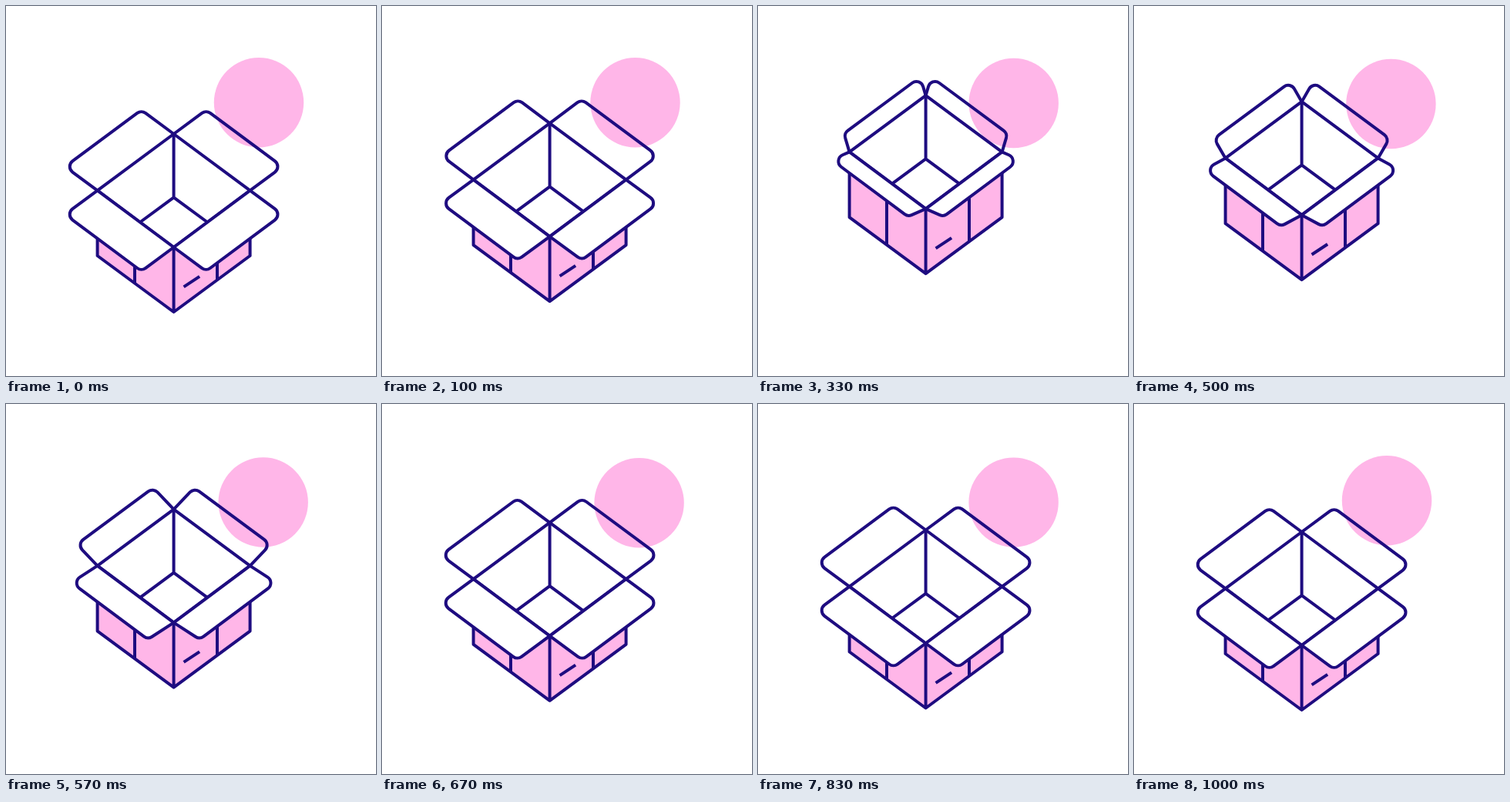
Write an HTML page that moves like this. It is 480 by 480 pixels and loops after 1030 ms.

```html
<!DOCTYPE html>
<html lang="en">
<head>
<meta charset="utf-8">
<title>Open box</title>
<style>
  html, body { margin: 0; width: 100%; height: 100%; overflow: hidden; background: #fff; }
  svg { display: block; width: 100vw; height: 100vh; }
  .line { fill: none; stroke: #1e0c80; stroke-width: 4; stroke-linejoin: round; }
  .flap { stroke-linecap: round; }
  .front { fill: #fff; }
  .pink { fill: #ffb6e8; }
</style>
</head>
<body>
<svg viewBox="0 0 480 480">
  <circle id="dot" class="pink" r="58.2"/>
  <g id="box">
    <path id="backLeft" class="line flap"/>
    <path id="backRight" class="line flap"/>
    <path id="body" class="line pink"/>
    <path id="details" class="line"/>
    <path id="frontLeft" class="line flap front"/>
    <path id="frontRight" class="line flap front"/>
    <path id="rim" class="line"/>
  </g>
</svg>
<script>
const LOOP = 1030, FPS = 30;
const PEAK = 0.3;             // seconds until the box is at its highest
const TOP = 116, DROP = 50;
const RADIUS = 9;
const el = id => document.getElementById(id);
const draw = (id, d) => el(id).setAttribute('d', d);
const lerp = (a, b, k) => a + (b - a) * k;

// Box corners, relative to the back corner of the rim
const back = [0, 0], left = [-99, 73.3], right = [99, 73.3], front = [0, 147];

draw('rim', `M${back}L${left}L${front}L${right}Z`);
draw('body', 'M-99 73.3L0 147L99 73.3V158L0 231L-99 158ZM0 147V231');
draw('details', 'M0 0V82.3M-43 114L0 82.3L43 114M-50.6 109V194M56.4 105V189M13 198.3L33.5 184.8');

function bezier(u, x1, y1, x2, y2) {
  const at = (s, a, b) => 3 * s * (1 - s) ** 2 * a + 3 * s * s * (1 - s) * b + s ** 3;
  let lo = 0, hi = 1;
  for (let i = 0; i < 24; i++) {
    const mid = (lo + hi) / 2;
    if (at(mid, x1, x2) < u) lo = mid; else hi = mid;
  }
  return at(lo, y1, y2);
}

// Catmull-Rom curve through evenly timed values
function curve(values, u) {
  const last = values.length - 1;
  const i = Math.min(last - 1, Math.floor(u * last));
  const k = u * last - i;
  const [a, b, c, d] = [-1, 0, 1, 2].map(n => values[Math.max(0, Math.min(last, i + n))]);
  return b + k * (c - a + k * (2 * a - 5 * b + 4 * c - d + k * (3 * (b - c) + d - a))) / 2;
}

function roundCorner(from, corner, to) {
  const unit = p => {
    const dx = p[0] - corner[0], dy = p[1] - corner[1], n = Math.hypot(dx, dy);
    return [dx / n, dy / n];
  };
  const a = unit(from), b = unit(to);
  const angle = Math.acos(a[0] * b[0] + a[1] * b[1]);
  const cut = RADIUS / Math.tan(angle / 2);
  const sweep = a[0] * b[1] - a[1] * b[0] < 0 ? 1 : 0;
  const along = v => [corner[0] + v[0] * cut, corner[1] + v[1] * cut];
  return `L${along(a)}A${RADIUS} ${RADIUS} 0 0 ${sweep} ${along(b)}`;
}

function flap(id, start, end, dx, dy) {
  const a = [start[0] + dx, start[1] + dy], b = [end[0] + dx, end[1] + dy];
  draw(id, `M${start}${roundCorner(start, a, b)}${roundCorner(a, b, end)}L${end}`);
}

function render(ms) {
  const t = Math.min(1, Math.floor((ms + 3.5) * FPS / 1000) / FPS);
  const drop = t < PEAK
    ? 1 - bezier(t / PEAK, 0.56, 0, 0.18, 1)
    : bezier((t - PEAK) / (1 - PEAK), 0.56, 0, 0.18, 0.95);
  const open = Math.min(1, drop * 1.36);

  el('box').setAttribute('transform', `translate(217.6 ${TOP + DROP * drop})`);
  const bx = lerp(7, 42, open), by = lerp(-24, -31, open);
  const fx = lerp(23, 42, open), fy = lerp(10, 31, open);
  flap('backLeft', back, left, -bx, by);
  flap('backRight', back, right, bx, by);
  flap('frontLeft', front, left, -fx, fy);
  flap('frontRight', front, right, fx, fy);

  el('dot').setAttribute('cx', curve([328, 329.1, 331.7, 333.4, 333.6, 331.6, 328], t));
  el('dot').setAttribute('cy', curve([125.2, 125.3, 126, 127, 128.2, 127.6, 125.2], t));
}

const began = performance.now();
function tick() {
  render((performance.now() - began) % LOOP);
  requestAnimationFrame(tick);
}
tick();
</script>
</body>
</html>
```
